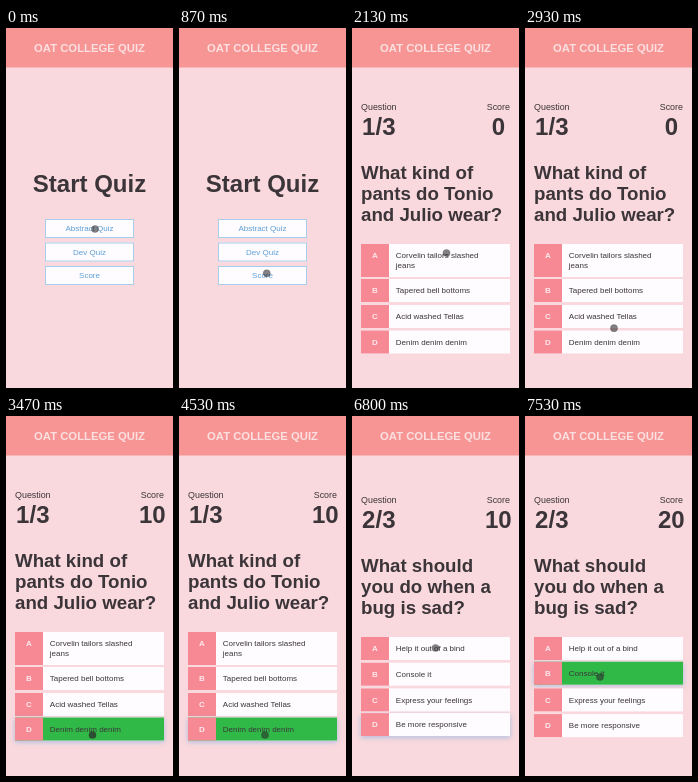
These frames come from a looping animation (167x360 px, 8 s). An HTML page with a canvas:

```html
<!DOCTYPE html>
<html lang="en">
<head>
<meta charset="utf-8">
<title>Quiz</title>
<style>
  html, body { margin: 0; width: 100%; height: 100%; overflow: hidden; background: #f9d9dd; }
  canvas { display: block; width: 167px; height: 360px; }
</style>
</head>
<body>
<canvas id="stage"></canvas>
<script>
const W = 167, H = 360, LOOP = 8000;
const canvas = document.getElementById('stage');
const ctx = canvas.getContext('2d');
const ratio = window.devicePixelRatio || 1;
canvas.width = W * ratio;
canvas.height = H * ratio;

const INK = '#3b3539', ROSE = '#f78994', WHITE = '#fefcfe', GREEN = '#31b948';
const FONT = '"Liberation Sans", Arial, sans-serif';

// Moments of the story, in ms
const PRESS_START = 1270, OPEN_QUIZ = 1600, ANSWER_1 = 3330, NEXT = 4870, ANSWER_2 = 7130;

const questions = [
  {
    count: '1/3', top: 0,
    lines: ['What kind of', 'pants do Tonio', 'and Julio wear?'],
    rows: [
      [216, 33, ['Corvelin tailors slashed', 'jeans']],
      [251, 23, ['Tapered bell bottoms']],
      [277, 23, ['Acid washed Tellas']],
      [302.5, 23, ['Denim denim denim']]
    ]
  },
  {
    count: '2/3', top: 5,
    lines: ['What should', 'you do when a', 'bug is sad?'],
    rows: ['Help it out of a bind', 'Console it', 'Express your feelings', 'Be more responsive']
      .map((label, i) => [221 + i * 25.7, 23, [label]])
  }
];

// Pointer stops: time, x, y
const path = [
  [0, 89, 201], [70, 89, 201], [450, 87, 225], [800, 87, 249], [1150, 94, 214],
  [1400, 96, 201], [1730, 96, 203], [2130, 94.5, 225], [2330, 94.5, 225],
  [3130, 88, 314], [3470, 86.5, 319], [3800, 86, 319], [4870, 86, 319],
  [5330, 90, 268], [5670, 88.5, 261], [5930, 84, 245], [6070, 83.5, 242],
  [6130, 83.5, 236], [6270, 83.5, 233], [6800, 83.5, 232], [7130, 76, 259],
  [7400, 75, 261], [LOOP, 75, 261]
];

const clamp = v => Math.max(0, Math.min(1, v));
const ease = v => v * v * (3 - 2 * v);
const ramp = (t, start, length) => ease(clamp((t - start) / length));

function pointerAt(t) {
  const i = Math.max(1, path.findIndex(stop => stop[0] > t));
  const [t0, x0, y0] = path[i - 1], [t1, x1, y1] = path[i];
  const k = ease(clamp((t - t0) / (t1 - t0)));
  return [x0 + (x1 - x0) * k, y0 + (y1 - y0) * k];
}

function text(str, x, y, size, { color = INK, bold = false, align = 'left' } = {}) {
  ctx.font = `${bold ? 'bold ' : ''}${size}px ${FONT}`;
  ctx.textAlign = align;
  ctx.fillStyle = color;
  ctx.fillText(str, x, y);
}

function box(x, y, w, h, color) {
  ctx.fillStyle = color;
  ctx.fillRect(x, y, w, h);
}

function shadowBox(x, y, w, h, color, strength) {
  ctx.save();
  ctx.shadowColor = `rgba(86, 160, 230, ${0.5 * strength})`;
  ctx.shadowBlur = 5 * ratio;
  ctx.shadowOffsetY = 1.5 * ratio;
  box(x, y, w, h, color);
  ctx.restore();
}

function drawStart(t) {
  text('Start Quiz', 83.5, 163.5, 24, { bold: true, align: 'center' });
  ['Abstract Quiz', 'Dev Quiz', 'Score'].forEach((label, i) => {
    const hover = i === 0 ? ramp(t, PRESS_START, 130) : 0;
    const y = 191 + i * 23.5 - hover;
    shadowBox(39, y, 89, 19, WHITE, hover);
    ctx.strokeStyle = '#a9cdec';
    ctx.lineWidth = 1;
    ctx.strokeRect(39.5, y + 0.5, 88, 18);
    text(label, 83.5, y + 12.2, 8, { color: '#5d9fd8', align: 'center' });
  });
}

function drawRow([top, h, lines], letter, hover, correct) {
  const y = top - hover;
  shadowBox(9, y, 149, h, WHITE, hover);
  if (correct) {
    ctx.globalAlpha = correct;
    box(9, y, 149, h, GREEN);
    ctx.globalAlpha = 1;
  }
  box(9, y, 28, h, ROSE);
  const middle = y + h / 2;
  const letterY = lines.length > 1 ? y + 13.8 : middle + 2.6;
  text(letter, 23, letterY, 8, { color: '#fde9ec', bold: true, align: 'center' });
  const first = middle + 2.6 - (lines.length - 1) * 5;
  lines.forEach((line, i) => text(line, 43.8, first + i * 10, 8));
}

// A small label with a large value centred beneath it
function drawStat(label, value, x, top) {
  text(label, x, 82.2 + top, 8.9, { align: 'center' });
  text(value, x, 106.6 + top, 24, { bold: true, align: 'center' });
}

function drawQuestion(t) {
  const second = t >= NEXT;
  const q = questions[second ? 1 : 0];
  const score = (t >= ANSWER_1 ? 10 : 0) + (t >= ANSWER_2 ? 10 : 0);
  const correct = ramp(t, second ? ANSWER_2 : ANSWER_1, 130);

  drawStat('Question', q.count, 26.8, q.top);
  drawStat('Score', String(score), 146.3, q.top);
  q.lines.forEach((line, i) =>
    text(line, 9, 151 + q.top + i * 21, 18.7, { bold: true }));

  const right = second ? 1 : 3;
  q.rows.forEach((row, i) => {
    const green = i === right ? correct : 0;
    const hover = second && i === 3 ? 1 - correct : green;
    drawRow(row, 'ABCD'[i], hover, green);
  });
}

function drawPointer(t) {
  const [x, y] = pointerAt(t);
  const pressed = [PRESS_START, ANSWER_1, ANSWER_2]
    .some(start => t >= start && t < start + 330);
  ctx.beginPath();
  ctx.arc(x, y, 3.6, 0, Math.PI * 2);
  ctx.fillStyle = `rgba(40, 38, 42, ${pressed ? 0.72 : 0.58})`;
  ctx.fill();
  ctx.strokeStyle = 'rgba(40, 38, 42, 0.25)';
  ctx.lineWidth = 0.8;
  ctx.stroke();
}

const origin = performance.now();

function frame(now) {
  const t = Math.max(0, now - origin) % LOOP;
  ctx.setTransform(ratio, 0, 0, ratio, 0, 0);
  box(0, 0, W, H, '#f9d9dd');
  box(0, 0, W, 39.5, '#f69593');
  text('OAT COLLEGE QUIZ', 83.5, 23.6, 11.3, { color: '#fcdfe0', bold: true, align: 'center' });
  if (t < OPEN_QUIZ) drawStart(t);
  else drawQuestion(t);
  drawPointer(t);
  requestAnimationFrame(frame);
}

requestAnimationFrame(frame);
</script>
</body>
</html>
```
